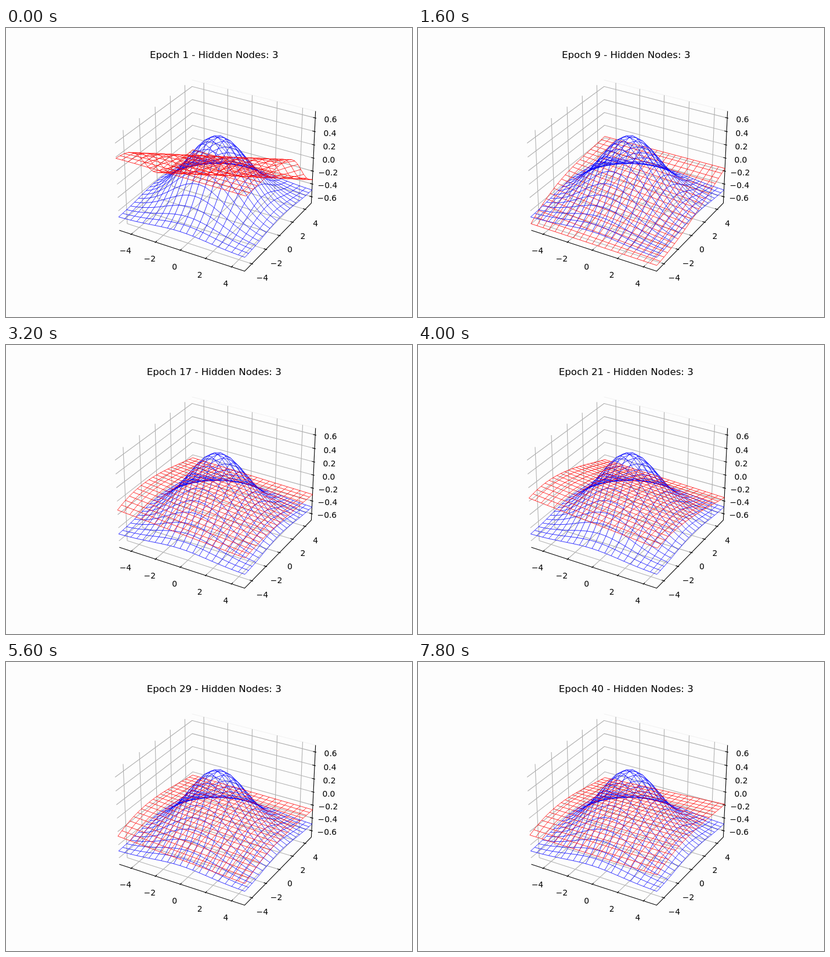
These frames come from a looping animation (700x500 px, 8 s). An HTML page with a canvas:

```html
<!DOCTYPE html>
<html lang="en">
<head>
<meta charset="utf-8">
<title>Network surface training</title>
<style>
html, body { margin: 0; width: 100%; height: 100%; overflow: hidden; background: #fdfdfd; }
canvas { display: block; }
</style>
</head>
<body>
<canvas id="stage" width="700" height="500"></canvas>
<script>
const ctx = document.getElementById('stage').getContext('2d');
const EPOCH_MS = 200, EPOCHS = 40;
const E = 5, H = 0.7;                        // half extents of the box
const XY_UNIT = 0.5952 / E, Z_UNIT = 0.4464 / H;

const steps = (from, to, count) =>
  Array.from({ length: count }, (_, i) => from + (to - from) * i / (count - 1));
const GRID = steps(-E, E, 21);

// Perspective camera: elevation 30, azimuth -60, distance 10.
function project([x, y, z]) {
  const X = x * XY_UNIT, Y = y * XY_UNIT, Z = z * Z_UNIT;
  const scale = 2081 / (10 - 0.433 * X + 0.75 * Y - 0.5 * Z);
  return [
    363.95 + scale * (0.866 * X + 0.5 * Y),
    247.3 - scale * (-0.25 * X + 0.433 * Y + 0.866 * Z)
  ];
}

function stroke(color, width, ...paths) {
  ctx.strokeStyle = color;
  ctx.lineWidth = width;
  ctx.beginPath();
  for (const path of paths) {
    path.forEach((p, i) => ctx[i ? 'lineTo' : 'moveTo'](...project(p)));
  }
  ctx.stroke();
}

function wireframe(color, height) {
  const point = (x, y) => [x, y, height(x, y)];
  stroke(color, 0.8,
    ...GRID.map(x => GRID.map(y => point(x, y))),
    ...GRID.map(y => GRID.map(x => point(x, y))));
}

const mix = (a, b, k) => a + (b - a) * k;
const bell = (x, y) => Math.exp(-(x * x + y * y) / 10) - 0.5;
const firstGuess = (x, y) => -0.39 * Math.tanh((y - 0.46 * x - 0.75) / 1.55);

// Learning overshoots and settles: a damped wave plus a slow drift moves
// the corners of a bulging sheet, which takes over from the first guess.
function networkAt(epoch) {
  const t = epoch - 1;
  const wave = Math.exp(-t / 16) * Math.cos(2 * Math.PI * t / 20.5);
  const drift = Math.sin(2 * Math.PI * (t - 13) / 34);

  const frontLeft = -0.22 + 0.67 * wave + 0.08 * drift;
  const frontRight = -0.3 + 0.67 * wave;
  const backLeft = -0.245 - 0.1 * wave - 0.002 * (t - 19);
  const backRight = -0.254 - 0.08 * wave - 0.073 * drift;
  const bulgeLeft = 0.12, bulgeRight = 0.09 * Math.tanh((t - 13) / 6);
  const learned = Math.min(1, t / 6);

  return (x, y) => {
    const across = (x + E) / (2 * E), back = (y + E) / (2 * E);
    const plane = mix(mix(frontLeft, frontRight, across), mix(backLeft, backRight, across), back);
    const bulge = mix(bulgeLeft, bulgeRight, across) * (1 - y * y / 25) * (1 - y / 10);
    return mix(firstGuess(x, y), plane + bulge, learned);
  };
}

function label(text, point, dx, dy) {
  const [x, y] = project(point);
  ctx.fillText(String(text).replace('-', '\u2212'), x + dx, y + dy + 5);
}

function drawAxes() {
  const ticks = steps(-4, 4, 5), zTicks = steps(-3, 3, 7).map(i => i / 5);
  const inner = 0.167, outer = 0.083;

  stroke('#f1f1f1', 1, [[-E, E, H], [E, E, H]]);
  stroke('#b0b0b0', 1.11,
    ...ticks.map(v => [[v, -E, -H], [v, E, -H], [v, E, H]]),
    ...ticks.map(v => [[E, v, -H], [-E, v, -H], [-E, v, H]]),
    ...zTicks.map(v => [[-E, -E, v], [-E, E, v], [E, E, v]]));
  stroke('#000', 1.11,
    [[-E, -E, -H], [E, -E, -H], [E, E, -H], [E, E, H]],
    ...ticks.map(v => [[v, -E - outer, -H], [v, -E + inner, -H]]),
    ...ticks.map(v => [[E + outer, v, -H], [E - inner, v, -H]]),
    ...zTicks.map(v => [[E + outer, E, v], [E - inner, E, v]]));

  ctx.font = '13.89px "DejaVu Sans", sans-serif';
  for (const v of ticks) {
    label(v, [v, -E, -H], -10, 28.5);
    label(v, [E, v, -H], 17.8, 24);
  }
  for (const v of zTicks) label(v.toFixed(1), [E, E, v], 26.4, 2.6);
}

function draw(epoch) {
  ctx.fillStyle = '#fdfdfd';
  ctx.fillRect(0, 0, 700, 500);
  ctx.fillStyle = '#000';
  ctx.textAlign = 'center';
  ctx.lineJoin = 'round';
  drawAxes();

  ctx.font = '16.67px "DejaVu Sans", sans-serif';
  ctx.fillText(`Epoch ${epoch} - Hidden Nodes: 3`, 358.75, 52);

  // The surface whose front corner is nearer the camera goes on top.
  [['#00f', bell], ['#f00', networkAt(epoch)]]
    .sort((a, b) => a[1](E, -E) - b[1](E, -E))
    .forEach(([color, height]) => wireframe(color, height));
}

let shown = 0;
function tick() {
  const epoch = 1 + Math.floor(performance.now() / EPOCH_MS) % EPOCHS;
  if (epoch !== shown) draw(shown = epoch);
  requestAnimationFrame(tick);
}
tick();
</script>
</body>
</html>
```
